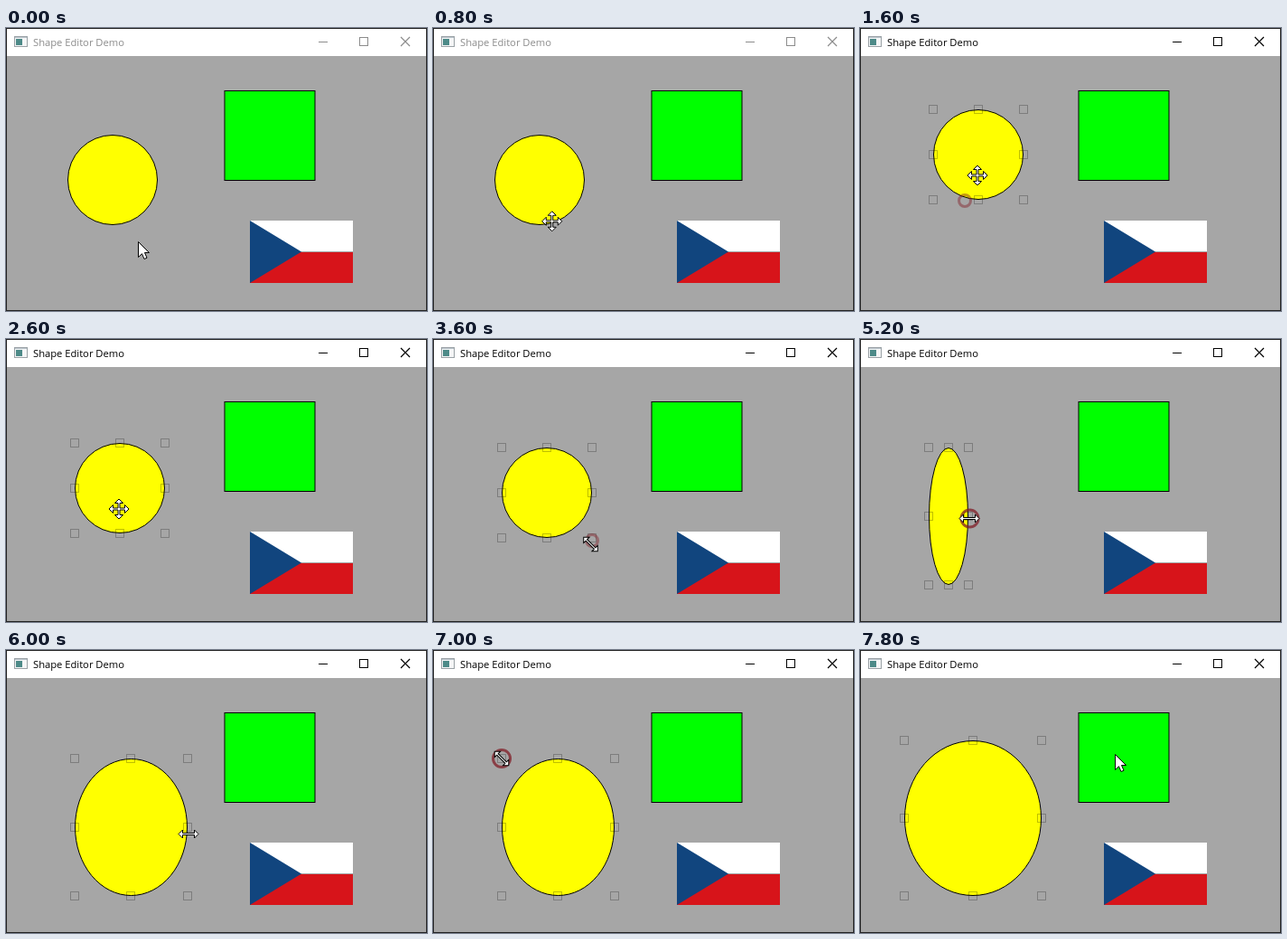
An HTML page for the animation above (8000 ms loop, 466 by 313 pixels).

```html
<!DOCTYPE html>
<html lang="en">
<head>
<meta charset="utf-8">
<title>Shape Editor Demo</title>
<style>
  html, body { margin: 0; width: 100%; height: 100%; overflow: hidden; }
  svg { display: block; width: 466px; height: 313px; }
  text { font: 11.2px "Open Sans", "Noto Sans", sans-serif; }
</style>
</head>
<body>
<svg viewBox="0 0 466 313">
  <rect width="466" height="313" fill="#a6a6a6"/>
  <rect width="466" height="31" fill="#fff"/>
  <g id="icon">
    <rect x="9.5" y="9.5" width="14" height="11" fill="#f4f5f6" stroke="#9aa1a6"/>
    <path d="M10 10.5H23" stroke="#b9c3ca"/>
    <rect x="11" y="12" width="7" height="7" fill="#4d8a88"/>
  </g>
  <text id="title" x="30" y="20">Shape Editor Demo</text>
  <g id="buttons" fill="none">
    <path d="M346 15.5H356"/>
    <rect x="391.5" y="10.5" width="9" height="9"/>
    <path d="M437 10L447 20M447 10L437 20" stroke-width="1.2"/>
  </g>
  <rect x=".5" y=".5" width="465" height="312" fill="none" stroke="#222"/>

  <rect x="242" y="69.5" width="100" height="99" fill="#0f0" stroke="#000"/>
  <g id="flag">
    <rect x="270" y="213" width="114" height="34" fill="#fff"/>
    <rect x="270" y="248" width="114" height="34" fill="#d7141a"/>
    <path d="M270 213L327 247.5L270 282Z" fill="#11457e"/>
  </g>

  <ellipse id="oval" fill="#ff0" stroke="#000"/>
  <path id="handles" fill="none" stroke="#000" stroke-opacity=".25"/>
  <circle id="ring" fill="none" stroke="#801c26" stroke-width="3"/>
  <path id="cursor" fill="#fff" stroke="#000"/>
</svg>
<script>
const LOOP = 8000, STEP = 200, RING_TIME = 400;
const $ = id => document.getElementById(id);
const set = (el, attrs) => {
  for (const k in attrs) el.setAttribute(k, attrs[k]);
};

// Progress from 0 to 1, and a swing that goes out and comes back
const ramp = (t, from, to) => Math.min(1, Math.max(0, (t - from) / (to - from)));
const swing = (t, from, to) => Math.sin(Math.PI * ramp(t, from, to));

function shapeAt(t) {
  const out = swing(t, 1400, 2600), back = swing(t, 2600, 3200);
  const drift = ramp(t, 1400, 2600), settle = ramp(t, 2600, 3200);
  const corner = ramp(t, 3600, 4400), side = ramp(t, 5200, 6000);
  const grow = ramp(t, 7000, 7400);

  const x = 68 + 8 * drift + 23.4 * out - 24 * back;
  const y = 118 - 3 * drift + 5 * settle - 55 * out - 27 * back;
  const w = 100 - 56 * corner - 68 * swing(t, 3600, 4400) + 81 * side - 80 * swing(t, 5200, 6000);
  const h = 100 + 52 * corner;
  const [l, top, r, b] = [x - 27 * grow, y - 20 * grow, x + w, y + h].map(Math.round);
  return { l, top, r, b, cx: (l + r) / 2, cy: (top + b) / 2 };
}

// What the pointer holds; it glides from one hold to the next
const holds = [
  { from: 0, to: 200, kind: 'arrow', at: () => [146.5, 236.5] },
  { from: 1400, to: 3200, kind: 'move', press: [116, 191], at: s => [s.l + 49, s.top + 73] },
  { from: 3400, to: 4400, kind: 'diagonal', press: [176, 223], at: s => [s.r - 1.5, s.b + 7] },
  { from: 5200, to: 6000, kind: 'wide', press: [121.5, 198.5], at: (s, p) => [s.r + 1, 198.5 + 5 * p] },
  { from: 7000, to: 7400, kind: 'diagonal', press: [76, 120], at: s => [s.l, s.top] },
  { from: 7800, to: LOOP, kind: 'arrow', at: () => [282.5, 115.5] }
];

const doubleArrow = 'M-11 0L-6.5 -4.5V-1H6.5V-4.5L11 0L6.5 4.5V1H-6.5V4.5Z';
const cursors = {
  arrow: 'M0 0V17L4 13.2L6.5 19L9.5 17.7L7 12H12Z',
  wide: doubleArrow,
  diagonal: doubleArrow,
  move: 'M0 -11L4.5 -6.5H1V-1H6.5V-4.5L11 0L6.5 4.5V1H1V6.5H4.5L0 11L-4.5 6.5H-1V1H-6.5V4.5L-11 0L-6.5 -4.5V-1H-1V-6.5H-4.5Z'
};

const holdAt = (hold, t) => hold.at(shapeAt(t), ramp(t, hold.from, hold.to));

function isOver(s, [x, y]) {
  return Math.hypot((x - s.cx) / (s.r - s.l), (y - s.cy) / (s.b - s.top)) < .5;
}

function pointerAt(t) {
  const i = holds.findLastIndex(h => h.from <= t);
  const hold = holds[i], next = holds[i + 1];
  if (t <= hold.to) return { pos: holdAt(hold, t), kind: hold.kind };

  const a = holdAt(hold, hold.to), b = holdAt(next, next.from);
  const p = ramp(t, hold.to, next.from);
  const pos = a.map((v, n) => v + (b[n] - v) * p);
  const hover = isOver(shapeAt(t), pos) ? 'move' : 'arrow';
  return { pos, kind: t >= next.from - STEP ? next.kind : hover };
}

function drawShape(t, selected) {
  const { l, top, r, b, cx, cy } = shapeAt(t);
  set($('oval'), { cx, cy, rx: Math.max(1, (r - l - 1) / 2), ry: (b - top - 1) / 2 });
  let d = '';
  for (const x of [l, cx, r]) {
    for (const y of [top, cy, b]) {
      if (x !== cx || y !== cy) d += `M${Math.floor(x) - 4.5} ${Math.floor(y) - 4.5}h9v9h-9Z`;
    }
  }
  set($('handles'), { d: selected ? d : '' });
}

function drawPointer(t) {
  const { pos, kind } = pointerAt(t);
  const turn = kind === 'diagonal' ? ' rotate(45)' : '';
  set($('cursor'), { d: cursors[kind], transform: `translate(${pos})${turn}` });

  const hold = holds.find(h => h.press && t >= h.from && t < h.from + RING_TIME);
  set($('ring'), { visibility: hold ? 'visible' : 'hidden' });
  if (hold) {
    const [cx, cy] = hold.press, age = (t - hold.from) / RING_TIME;
    set($('ring'), { cx, cy, r: 9.5 - 6 * age, opacity: .75 - .6 * age });
  }
}

function render(time) {
  const t = Math.floor(time % LOOP / STEP) * STEP;
  const active = t >= holds[1].from;
  const ink = active ? '#000' : '#8c8c8c';
  set($('title'), { fill: ink });
  set($('buttons'), { stroke: ink });
  drawShape(t, active);
  drawPointer(t);
}

const start = performance.now();
function tick() {
  render(performance.now() - start);
  requestAnimationFrame(tick);
}
tick();
</script>
</body>
</html>
```
